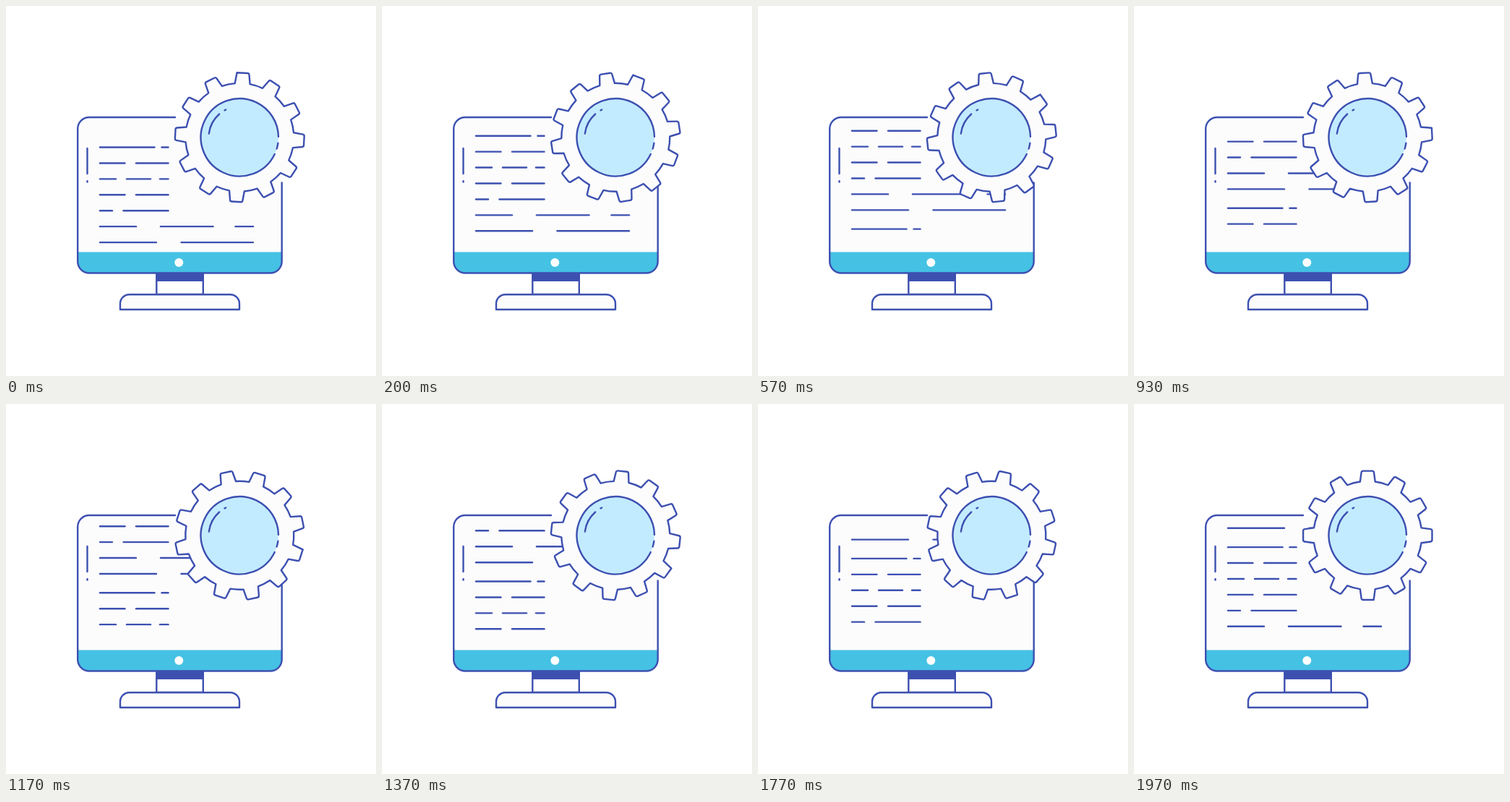
These frames come from a looping animation (512x512 px, 2 s). An HTML page with a canvas:

```html
<!DOCTYPE html>
<html lang="en">
<head>
<meta charset="utf-8">
<title>Code processing</title>
<style>
  html, body { margin: 0; width: 100%; height: 100%; overflow: hidden; background: #fff; }
  canvas { display: block; width: 100vw; height: 100vh; }
</style>
</head>
<body>
<canvas id="stage" width="512" height="512"></canvas>
<script>
const ctx = document.getElementById('stage').getContext('2d');
const INK = '#3d50b0', PAPER = '#fcfcfd', BAR = '#45c1e4', GLASS = '#c3ebff';
const LOOP = 2000, FRAMES = 60, TAU = Math.PI * 2, DEG = Math.PI / 180;
const CX = 323.3, CY = 181.8, TEETH = 12;

// Dashes of each code row as start/end pairs
const ROWS = [
  [130, 205.5, 215.5, 224.5],
  [130, 164.5, 180, 224.5],
  [130, 152, 167, 200, 213, 224.5],
  [130, 164.5, 180, 224.5],
  [130, 147, 162.5, 224.5],
  [130, 180, 214, 286.5, 317.5, 342],
  [130, 208, 242.5, 342]
];
const ROW_TOP = 195.5, ROW_GAP = 21.93, CYCLE = 157.9;

function fill(color) {
  ctx.fillStyle = color;
  ctx.fill();
}

function line(x1, y1, x2, y2) {
  ctx.beginPath();
  ctx.moveTo(x1, y1);
  ctx.lineTo(x2, y2);
  ctx.stroke();
}

function arc(r, from, to) {
  ctx.beginPath();
  ctx.arc(0, 0, r, from * DEG, to * DEG);
  ctx.stroke();
}

function drawStand() {
  ctx.beginPath();
  ctx.rect(208.3, 369.5, 64.5, 29.5);
  fill('#fff');
  ctx.stroke();
  ctx.fillStyle = INK;
  ctx.fillRect(208.3, 369.5, 64.5, 11.5);

  ctx.beginPath();
  ctx.moveTo(158, 420);
  ctx.lineTo(158, 412);
  ctx.arcTo(158, 399.2, 171, 399.2, 12.8);
  ctx.lineTo(310, 399.2);
  ctx.arcTo(323, 399.2, 323, 412, 12.8);
  ctx.lineTo(323, 420);
  ctx.closePath();
  fill(PAPER);
  ctx.stroke();
}

function drawRows(progress) {
  ctx.save();
  ctx.beginPath();
  ctx.rect(99, 167, 283, 172.6);
  ctx.clip();
  const shift = progress * CYCLE;
  ROWS.forEach((row, i) => {
    let y = ROW_TOP + i * ROW_GAP - shift;
    if (y < 164) y += CYCLE;
    for (let k = 0; k < row.length; k += 2) line(row[k], y, row[k + 1], y);
  });
  ctx.restore();
}

function drawMonitor(progress) {
  ctx.beginPath();
  ctx.roundRect(99.2, 154, 282.5, 215.5, 16);
  fill(PAPER);
  drawRows(progress);

  ctx.beginPath();
  ctx.roundRect(99.2, 340.5, 282.5, 29, [0, 0, 16, 16]);
  fill(BAR);
  ctx.beginPath();
  ctx.arc(239.3, 355, 6, 0, TAU);
  fill('#fff');

  ctx.beginPath();
  ctx.moveTo(234, 154);
  ctx.arcTo(99.2, 154, 99.2, 200, 16);
  ctx.arcTo(99.2, 369.5, 150, 369.5, 16);
  ctx.arcTo(381.7, 369.5, 381.7, 300, 16);
  ctx.lineTo(381.7, 244.5);
  ctx.stroke();

  line(112.5, 197, 112.5, 232);
  line(112.5, 242.3, 112.5, 243.5);
}

function drawGear(angle) {
  const root = 75, tip = 89.2, half = 8.4, foot = 8 * DEG, step = TAU / TEETH;
  ctx.save();
  ctx.translate(CX, CY);

  ctx.save();
  ctx.rotate(angle);
  ctx.beginPath();
  for (let i = 0; i < TEETH; i++) {
    const a = i * step - Math.PI / 2, c = Math.cos(a), s = Math.sin(a);
    const at = (r, w) => [r * c - w * s, r * s + w * c];
    const base = at(root * Math.cos(foot), root * Math.sin(foot));
    ctx.arcTo(...at(tip, -half), ...at(tip, 0), 2.4);
    ctx.arcTo(...at(tip, half), ...base, 2.4);
    ctx.lineTo(...base);
    ctx.arc(0, 0, root, a + foot, a + step - foot);
  }
  ctx.closePath();
  fill(PAPER);
  ctx.stroke();
  ctx.restore();

  ctx.beginPath();
  ctx.arc(0, 0, 53.7, 0, TAU);
  fill(GLASS);
  arc(53.7, 25.5, 359);
  arc(53.7, 8.5, 17);
  arc(42.8, 187, 229);
  arc(42.8, 241, 243.5);
  ctx.restore();
}

function draw(progress) {
  ctx.fillStyle = '#fff';
  ctx.fillRect(0, 0, 512, 512);
  ctx.strokeStyle = INK;
  ctx.lineWidth = 2.4;
  ctx.lineCap = ctx.lineJoin = 'round';
  drawStand();
  drawMonitor(progress);
  drawGear((3 + 180 * progress) * DEG);
}

// Thirty steps per second, rounded to hundredths
function stepAt(t) {
  const rest = t % 100;
  return Math.floor(t / 100) * 3 + (rest >= 70 ? 2 : rest >= 30 ? 1 : 0);
}

let start = null;
function tick(now) {
  if (start === null) start = now;
  draw(stepAt(Math.max(0, now - start) % LOOP) / FRAMES);
  requestAnimationFrame(tick);
}
draw(0);
requestAnimationFrame(tick);
</script>
</body>
</html>
```
